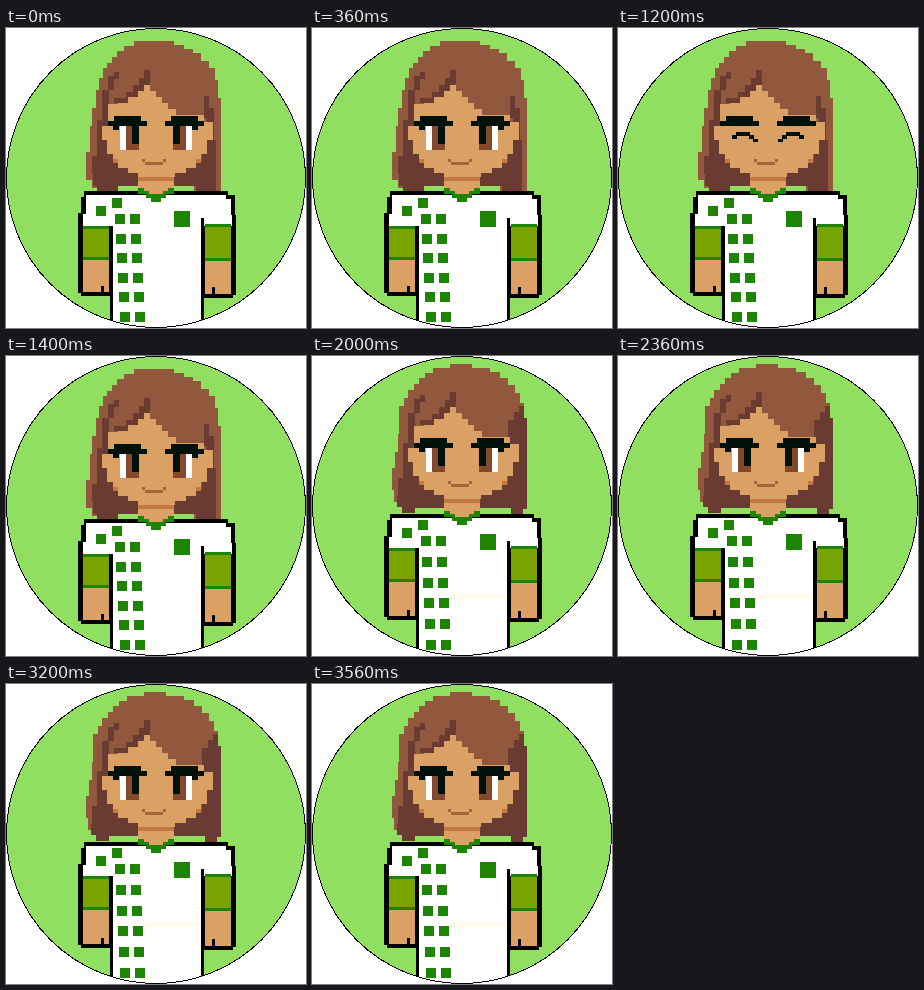
Write an HTML page that moves like this. It is 300x300 px and loops after 3.8 s.

```html
<!DOCTYPE html>
<html lang="en">
<head>
<meta charset="utf-8">
<title>Pixel avatar</title>
<style>
html, body { margin: 0; width: 100%; height: 100%; overflow: hidden; background: #fff; }
svg { display: block; width: 300px; height: 300px; shape-rendering: crispEdges; }
.low, .high, .open, .shut, .tongue { animation: 3.8s step-end infinite; }
.low { animation-name: low; }
.high { animation-name: high; }
.open { animation-name: open; }
.shut { animation-name: shut; }
.tongue { animation-name: tongue; }
@keyframes low {
  0%, 31.5789%, 68.4211% { opacity: 1; }
  15.7895%, 52.6316%, 84.2105%, 100% { opacity: 0; }
}
@keyframes high {
  0%, 31.5789%, 68.4211% { opacity: 0; }
  15.7895%, 52.6316%, 84.2105%, 100% { opacity: 1; }
}
@keyframes open { 0%, 36.8421%, 100% { opacity: 1; } 31.5789% { opacity: 0; } }
@keyframes shut { 0%, 36.8421%, 100% { opacity: 0; } 31.5789% { opacity: 1; } }
@keyframes tongue { 0%, 84.2105%, 100% { opacity: 0; } 68.4211% { opacity: 1; } }
</style>
</head>
<body>
<svg id="stage" viewBox="0 0 300 300"></svg>
<script>
const C = {
  bg: '#90df60', ink: '#000', brow: '#00100a', white: '#fff', hair: '#92583e', dark: '#693b32',
  skin: '#dba164', shade: '#c27840', lip: '#a5633c', iris: '#84492d',
  green: '#1d8405', olive: '#78a300'
};
const path = (fill, d) => `<path fill="${fill}" d="${d}"/>`;
const box = (fill, x, y, w, h) => path(fill, `M${x} ${y}h${w}v${h}h${-w}z`);
const group = (name, ...parts) => `<g class="${name}">${parts.join('')}</g>`;
const lift = (dy, ...parts) => `<g transform="translate(0 ${dy})">${parts.join('')}</g>`;

function sleeve(x, top, bottom, hand) {
  return box(C.skin, x, bottom, 26, hand - bottom) +
    box(C.olive, x, top, 26, bottom - top) +
    box(C.green, x, top, 26, 3) + box(C.green, x, bottom - 3, 26, 3);
}

function body(top, band, hand, first) {
  let s = path(C.ink, `M78 ${top}H222V${top + 4}H229V${top + 24}H230V${hand + 2}H227V${hand + 5}H195V294H104V${hand + 3}H75V${hand}H72V${top + 22}H75V${top + 6}H78Z`);
  s += path(C.white, `M80 ${top + 4}H220V${top + 8}H225V${top + 24}H226V${band}H198V${top + 27}H195V300H107V${band}H77V${top + 23}H80Z`);
  s += sleeve(77, band, band + 34, hand - 1) + sleeve(199, band - 2, band + 35, hand + 1);
  s += box(C.ink, 104, band, 3, 294 - band);
  s += box(C.ink, 195, top + 27, 3, 267 - top);
  s += box(C.ink, 95, hand - 7, 3, 7) + box(C.ink, 206, hand - 6, 3, 7);
  s += path(C.green, `M132 ${top - 3}h36v6h-8v4h-5v4h-10v-4h-5v-4h-8z`);
  s += path(C.skin, `M138 ${top - 8}h24v8h-5v3h-14v-3h-5z`);
  s += box(C.green, 90, first - 13, 10, 10) + box(C.green, 106, first - 21, 10, 10);
  for (let i = 0; i < 6; i++) {
    const x = Math.round(109 + i * 0.9);
    const y = Math.round(first - 5 + (289 - first) / 5 * i);
    s += box(C.green, x, y, 10, 10) + box(C.green, x + 15, y, 10, 10);
  }
  return s + box(C.green, 168, top + 20, 16, 16);
}

const neck = box(C.skin, 132, 147, 36, 18) + box(C.shade, 132, 147, 36, 6);

const face = path(C.skin, 'M138 57H144V63H150V69H156V75H162V81H170V87H198V94H207V112H201V126H195V134H190V140H180V145H169V149H132V145H122V140H112V134H107V126H101V112H96V98H102V76H112V75H122V69H132V63H138Z') +
  path(C.dark, 'M138 42H144V57H138V63H132V69H122V75H108V70H120V64H127V57H133V50H138Z') +
  box(C.shade, 107, 131, 5, 4) + box(C.shade, 190, 131, 5, 4);

const mouth = box(C.lip, 139, 134, 18, 3) + box(C.lip, 136, 131, 3, 3) + box(C.lip, 157, 131, 3, 3);

const eyes = box(C.white, 114, 97, 6, 25) + box(C.iris, 120, 97, 13, 25) + box(C.brow, 126, 97, 7, 19) +
  box(C.iris, 167, 97, 13, 25) + box(C.brow, 167, 97, 7, 19) + box(C.white, 180, 97, 6, 25);

const brows = path(C.brow, 'M108 88H135V93H141V98H113V102H107V98H102V93H108Z') +
  path(C.brow, 'M165 88H192V93H198V98H192V102H186V98H159V93H165Z');

const arc = path(C.brow, 'M114 107h4v-3h14v3h4v4h4v3h-5v-3h-4v-3h-12v3h-5z');
const shut = path(C.brow, 'M108 88H135V93H141V98H102V93H108Z') +
  path(C.brow, 'M165 88H192V93H198V98H159V93H165Z') +
  arc + `<g transform="matrix(-1 0 0 1 300 0)">${arc}</g>`;

const low = group('low',
  path(C.hair, 'M128 13H168V17H178V21H187V25H195V33H203V40H209V52H212V70H215V166H91V160H86V152H80V124H84V98H86V80H90V62H93V50H97V40H101V35H106V29H111V23H118V18H128Z'),
  path(C.bg, 'M112 158H188V166H112Z'),
  path(C.dark, 'M102 48H108V62H103V76H102V126H108V134H113V140H123V145H134V158H112V164H91V158H87V146H86V128H91V92H96V62H102Z'),
  path(C.dark, 'M198 68H203V80H208V112H210V164H190V158H166V145H180V140H190V134H196V126H201V90H198Z'),
  box(C.dark, 108, 44, 5, 7),
  neck, face,
  group('open', eyes, brows), group('shut', shut), mouth,
  group('tongue', path('#f07090', 'M143 137H153V141H151V145H145V141H143Z')),
  body(163, 198, 265, 191));

const high = group('high',
  path(C.hair, 'M138 8H160V12H178V16H188V22H196V29H203V37H208V47H212V62H215V153H211V158H199V152H103V157H90V151H85V146H82V134H80V112H83V96H86V78H87V50H92V42H96V34H102V28H107V22H113V17H121V12H138Z'),
  path(C.dark, 'M196 64H202V56H207V50H212V62H215V153H211V158H199V152H166V139H180V134H190V128H196Z'),
  path(C.dark, 'M102 43H108V57H103V120H108V128H113V134H123V139H134V152H103V157H90V151H85V140H86V122H91V87H96V57H102Z'),
  box(C.dark, 108, 39, 5, 7),
  lift(-6, neck, face, eyes, brows, mouth),
  body(158, 192, 261, 185),
  box('#fffbe8', 138, 239, 57, 4));

document.getElementById('stage').innerHTML =
  '<clipPath id="disc"><circle cx="150" cy="150" r="149.5"/></clipPath>' +
  `<circle cx="150" cy="150" r="149.5" fill="${C.bg}"/>` +
  `<g clip-path="url(#disc)">${low}${high}</g>` +
  '<circle cx="150" cy="150" r="149.5" fill="none" stroke="#000"/>';
</script>
</body>
</html>
```
